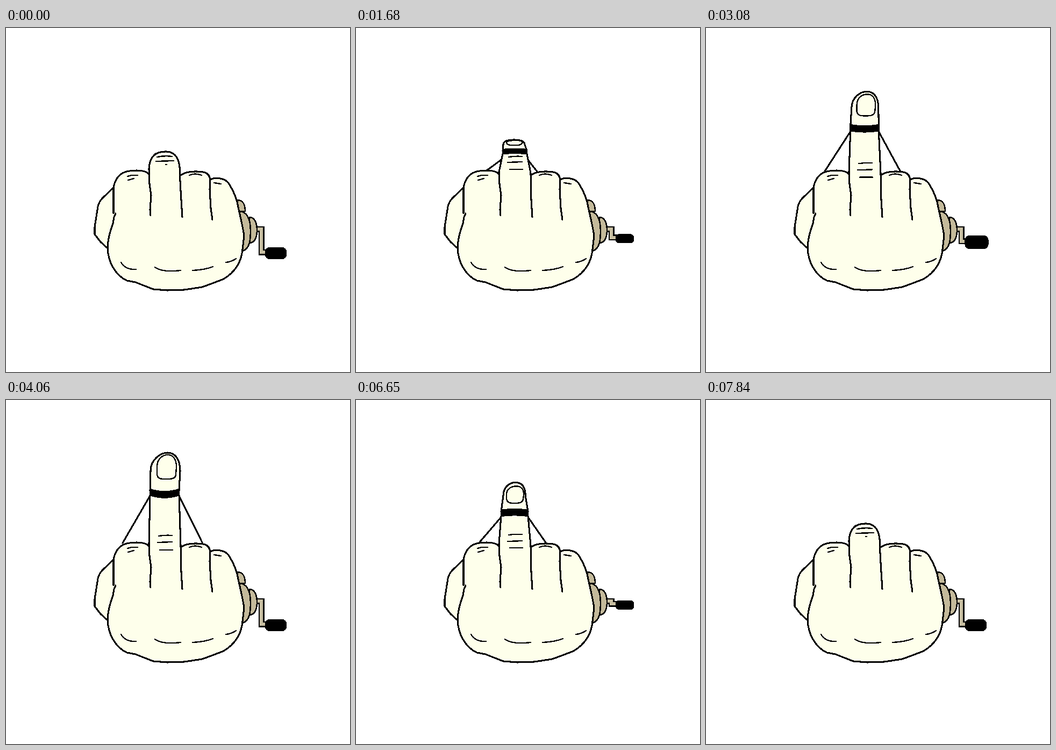
An HTML page that plays this animation: 640x640 px, repeating every 8.05 s.

```html
<!DOCTYPE html>
<html lang="en">
<head>
<meta charset="utf-8">
<title>Crank hand</title>
<style>
  html, body { margin: 0; width: 100%; height: 100%; overflow: hidden; background: #fff; }
  svg { display: block; width: 100vw; height: 100vh; }
  path, rect { shape-rendering: crispEdges; }
  path { fill: none; stroke: #000; stroke-width: 3.1; stroke-linejoin: round; stroke-linecap: round; }
  .skin { fill: #feffeb; }
  .fill { fill: #feffeb; stroke: none; }
  .metal { fill: #c4ba9b; stroke-width: 2.6; }
  .fine { stroke-width: 2.4; }
  .band { fill: #000; stroke-width: 2.5; }
  #armEdge { stroke-width: 11; stroke-linejoin: miter; stroke-linecap: butt; }
  #armCore { stroke: #c8bfa2; stroke-width: 6; stroke-linejoin: miter; stroke-linecap: butt; }
</style>
</head>
<body>
<svg viewBox="0 0 640 640">
  <!-- reel and crank -->
  <path id="armEdge"/>
  <path id="armCore"/>
  <rect id="grip"/>
  <path class="metal" d="M453 352C462 352 467 362 467 376C467 390 463 399 453 400Z"/>
  <path class="metal" d="M430 320C440 320 445 326 445 341L432 342Z"/>
  <path class="metal" d="M434 341C448 341 455 355 455 378C455 402 450 413 439 415Z"/>

  <!-- fist -->
  <path class="skin" d="M200 297L180 316Q173 323 171 332L165 370L165 384L176 398L188 409L215 400Z"/>
  <path id="strings"/>
  <path class="fill" d="M200 345L200 298C202 282 211 268 230 266C245 264 260 264 267 273L325 275C336 266 352 266 367 268Q378 270 380 282C390 277 408 279 415 290C424 304 430 318 433 338C437 355 441 374 443 386L440 412C438 436 426 454 405 467L384 475L365 482L332 487L300 488L274 486L256 479L241 473L225 470C203 460 190 435 189 409C190 387 195 376 199 362Z"/>
  <path d="M204 345L201 352L199 364C195 376 190 387 189 409C190 435 203 460 225 470L241 473L256 479L274 486L300 488L332 487L365 482L384 475L405 467C426 454 438 436 440 412L443 386C441 374 437 355 433 338C430 318 424 304 415 290C408 279 390 277 380 282"/>
  <path d="M200 345L200 298C202 282 211 268 230 266C245 264 260 264 267 273M325 274C336 266 352 266 367 268Q378 270 380 282L379 300L381 335L384 357"/>
  <path class="fine" d="M226 276Q234 273 245 274M227 283L238 280M341 274Q352 269 364 274M387 288L400 290"/>
  <path class="fine" d="M214 436Q222 450 242 449M277 445Q290 455 325 451M347 451Q370 450 385 444M409 436Q420 435 428 429"/>

  <!-- middle finger -->
  <path class="skin" id="tip"/>
  <path id="nail" class="fine"/>
  <path class="fill" id="bodyFill"/>
  <path id="body"/>
  <path class="band" id="band"/>
  <path id="creases" class="fine"/>
</svg>
<script>
const STEP = 70, LOOP = 8050;
const el = id => document.getElementById(id);
const draw = (id, d) => el(id).setAttribute('d', d);

// Piecewise linear lookup in rows of [x, value]
function along(keys, x) {
  if (x <= keys[0][0]) return keys[0][1];
  for (let i = 1; i < keys.length; i++) {
    const [x0, v0] = keys[i - 1], [x1, v1] = keys[i];
    if (x <= x1) return v0 + (v1 - v0) * (x - x0) / (x1 - x0);
  }
  return keys[keys.length - 1][1];
}

// Finger extension: 0 bent, 3 fully raised
const RAISE = [[0, 0], [9, 1], [12, 1.17], [21, 2], [24, 2.35], [35, 3]];
const LOWER = [[1, 3], [12, 1.47], [14, 1.15], [23, 0]];
const WIND = [[0, 0], [9, 265], [21, 540], [40, 1080]];
const UNWIND = [[0, 0], [1, 15], [14, 450], [23, 720]];

// Value of each measure at extension 0, 1, 2 and 3
const POSE = {
  top: [232, 208, 155, 98],
  bandY: [239, 226, 206, 166],
  bandH: [8, 8, 11, 11],
  bow: [-1, -2, -4, 9],
  bandL: [274, 273, 270, 268],
  bandR: [316, 318, 320, 322],
  tipL: [277, 274, 274, 269],
  tipR: [312, 314, 315, 324],
  nailL: [284, 280, 280, 281],
  nailR: [306, 310, 312, 317],
  nailT: [236, 209, 162, 102],
  nailB: [238, 218, 193, 147],
  tieY: [258, 243, 219, 178],
  tieL: [262, 242, 229, 217],
  tieR: [326, 337, 354, 366],
  c1: [240, 240, 251, 253],
  c2: [248, 250, 263, 265],
  c3: [254, 263, 275, 279]
};

function pose(p) {
  const out = {};
  for (const name in POSE) out[name] = along(POSE[name].map((v, i) => [i, v]), p);
  return out;
}

function drawFinger(p) {
  const f = pose(p), bent = p < 0.5;
  const mid = (f.tipL + f.tipR) / 2 + Math.max(p - 1, 0) * 2.2;
  const h = f.bandY - f.top, low = f.bandY + f.bandH;
  const side = f.top + h * 0.5, curl = f.top + h * 0.17;

  draw('tip', `M${f.bandL} ${f.bandY + 3}L${f.tipL} ${side}C${f.tipL} ${curl} ${mid - 12} ${f.top} ${mid} ${f.top}` +
    `C${mid + 13} ${f.top} ${f.tipR} ${curl} ${f.tipR} ${side}L${f.bandR} ${f.bandY + 3}`);

  // A short nail is nearly an ellipse, a long one has square lower corners
  const nh = f.nailB - f.nailT, nm = (f.nailL + f.nailR) / 2;
  const brow = f.nailT + nh * 0.5, lift = f.nailT + nh * 0.15;
  const foot = f.nailB - Math.min(nh * 0.5, 8);
  draw('nail', `M${f.nailL} ${brow}C${f.nailL} ${lift} ${nm - 7} ${f.nailT} ${nm + 2} ${f.nailT}` +
    `C${nm + 11} ${f.nailT} ${f.nailR} ${lift} ${f.nailR} ${brow}` +
    `L${f.nailR - 1} ${foot}Q${f.nailR - 2} ${f.nailB} ${nm + 4} ${f.nailB}` +
    `L${nm - 6} ${f.nailB}Q${f.nailL + 1} ${f.nailB} ${f.nailL} ${foot}Z`);

  const left = 'M269 349L268 338L270 311L267 290';
  const right = 'L326 320L328 352';
  if (bent) {
    const arch = left + 'L266 262C267 240 278 230 296 230C312 229 321 240 323 258L324 285' + right;
    draw('bodyFill', arch + 'Z');
    draw('body', arch);
  } else {
    const a = left + `L266 268L${f.bandL} ${low}`;
    const b = `${f.bandR} ${low}L325 270` + right;
    draw('bodyFill', a + 'L' + b + 'Z');
    draw('body', a + 'M' + b);
  }

  const bow = y => `Q295 ${y + f.bow}`;
  draw('band', bent ? '' : `M${f.bandL} ${f.bandY}${bow(f.bandY)} ${f.bandR} ${f.bandY}` +
    `L${f.bandR} ${low}${bow(low)} ${f.bandL} ${low}Z`);
  draw('strings', bent ? '' : `M${f.bandL} ${f.tieY}L${f.tieL} 266M${f.bandR} ${f.tieY}L${f.tieR} 267`);

  const open = Math.min(p, 1), half = 1 + 11 * open;
  draw('creases', `M${281 + 3 * open} ${f.c1}Q296 ${f.c1 - 3 + open} 309 ${f.c1 - 1}` +
    `M${279 + 3 * open} ${f.c2}L${312 - 3 * open} ${f.c2 - 1}` +
    `M${298 - half} ${f.c3}L${298 + half} ${f.c3}`);
}

function drawCrank(deg) {
  const a = deg * Math.PI / 180, near = Math.sin(a);
  const y = 383 + 36 * Math.cos(a) - 12 * near;
  const h = 22 + 5 * near, w = 40 + 6 * near;
  const arm = `M464 374L475 374L475 ${y - 2}L488 ${y - 2}`;
  draw('armEdge', arm);
  draw('armCore', arm);
  const box = { x: 482 - near, y: y - h / 2, width: w, height: h, rx: h * 0.36 };
  for (const k in box) el('grip').setAttribute(k, box[k]);
}

function frame(now) {
  const n = Math.floor(now % LOOP / STEP);
  const back = n >= 88;
  const s = back ? n - 87 : n - 15;
  drawFinger(along(back ? LOWER : RAISE, s));
  drawCrank(along(back ? UNWIND : WIND, s));
}

let start;
function tick(now) {
  start ??= now;
  frame(now - start);
  requestAnimationFrame(tick);
}
frame(0);
requestAnimationFrame(tick);
</script>
</body>
</html>
```
